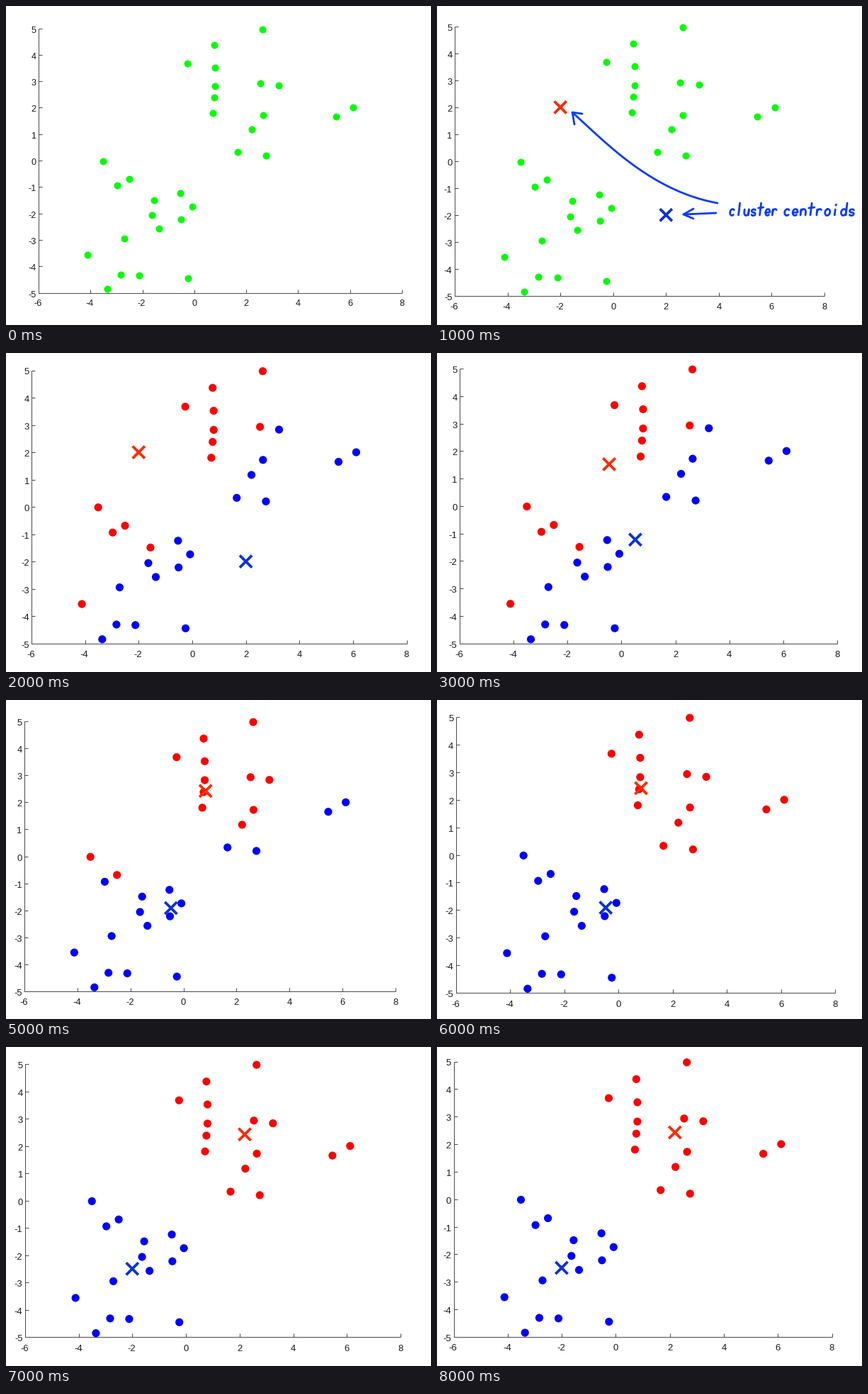
A matplotlib script that plays this animation: 600x450 px, repeating every 9 s.

```python
import numpy as np
import matplotlib.pyplot as plt
from matplotlib.animation import FuncAnimation

W, H, DPI = 600, 450, 100
PX = 72 / DPI  # points per pixel
ASPECT = 1.375  # plot width / height

GREEN, RED, BLUE = "#00ff00", "#ff0000", "#0000ff"
CROSS = ("#ff2a00", "#0a32d8")
INK = "#0a3cff"
AXIS = "#4a4a4a"

# The sample data: an upper and a lower cloud
UPPER = [(2.63, 4.97), (0.76, 4.36), (-0.26, 3.67), (0.8, 3.52), (0.8, 2.82),
         (0.76, 2.38), (0.71, 1.8), (2.53, 2.93), (3.24, 2.83), (2.64, 1.72),
         (2.21, 1.17), (1.66, 0.33), (2.75, 0.2), (5.46, 1.65), (6.12, 2)]
LOWER = [(-3.51, -0.02), (-2.97, -0.94), (-2.51, -0.69), (-1.56, -1.49),
         (-0.53, -1.24), (-0.08, -1.74), (-1.64, -2.06), (-1.36, -2.57),
         (-0.51, -2.22), (-2.71, -2.95), (-4.12, -3.56), (-2.83, -4.31),
         (-2.12, -4.33), (-3.36, -4.85), (-0.25, -4.45)]
POINTS = np.array(UPPER + LOWER)
START = np.array([(-2.0, 2.0), (2.0, -2.0)])

# Left, top and width of the plot in every step
BOXES = [(46, 31.5, 513), (25, 29, 522), (36, 24.5, 529.5),
         (32, 22, 533), (28, 30.5, 522.5), (26, 30, 524),
         (27, 24, 535), (27, 24, 530), (23.5, 20.5, 534)]


def k_means(rounds):
    """Alternate assign and move steps, as (labels, centers) pairs."""
    centers, steps = START, []
    for _ in range(rounds):
        gaps = POINTS[:, None] - centers
        labels = (gaps ** 2).sum(axis=2).argmin(axis=1)
        steps.append((labels, centers))
        centers = np.array([POINTS[labels == k].mean(axis=0) for k in (0, 1)])
        steps.append((labels, centers))
    return steps


STEPS = [(None, None), (None, START)] + k_means(4)[:7]


def arc(start, stop, cy=2, rx=4, ry=4.5):
    a = np.radians(np.linspace(start, stop, 24))
    return np.column_stack([4 + rx * np.cos(a), cy + ry * np.sin(a)])


def path(*parts):
    return np.vstack(parts)


# Pen strokes of each letter, y down, built from bowls and stems
STEM = path((0, -2), (0, 6))
TALL = path((3, -11), (3, 6))
LETTERS = {
    "c": [arc(-45, -310)],
    "e": [path((0.5, 2.5), arc(0, -310))],
    "o": [arc(-90, -450)],
    "d": [arc(-30, -330), TALL + (5, 0)],
    "l": [TALL],
    "t": [TALL, path((-1, -4), (8, -5))],
    "i": [STEM + (3, 0), path((3, -8), (3.5, -9))],
    "n": [STEM, path(arc(180, 360), (8, 6))],
    "r": [STEM, arc(180, 310)],
    "u": [path((0, -2), arc(180, 0), (8, -2)), STEM + (8, 0)],
    "s": [path(arc(-30, -270, 0, 3.5, 2.2), arc(-90, 150, 4.4, 3.5, 2.2))],
}

fig = plt.figure(figsize=(W / DPI, H / DPI), dpi=DPI, facecolor="white")
ax = fig.add_axes([0, 0, 1, 1])


def line(pts, color, width, **kw):
    x, y = np.transpose(pts)
    ax.plot(x, y, color=color, lw=width * PX, **kw)


def ink(pts):
    line(pts, INK, 2.8, solid_capstyle="round", solid_joinstyle="round",
         zorder=4)


def bezier(a, b, c, d):
    t = np.linspace(0, 1, 40)[:, None]
    a, b, c, d = np.array([a, b, c, d])
    return ((1 - t) ** 3 * a + 3 * t * (1 - t) ** 2 * b
            + 3 * t ** 2 * (1 - t) * c + t ** 3 * d)


def write(word, x, y, pitch):
    """Slanted handwriting with evenly spaced letters."""
    slant = np.array([(pitch / 13, 0), (-0.12, 1)])
    for i, ch in enumerate(word):
        for stroke in LETTERS[ch]:
            ink(stroke @ slant + (x + i * pitch, y))


def draw_notes():
    ink(bezier((192, 151), (238, 192), (302, 261), (396, 278)))
    ink([(194, 167), (191, 150), (205, 152)])
    ink([(394, 292), (348, 294)])
    ink([(362, 286), (348, 294), (362, 300)])
    write("cluster", 414, 289, 10)
    write("centroids", 491, 289, 11.4)


def to_px(box, pts):
    left, top, width = box
    x, y = np.asarray(pts, float).T
    return np.column_stack([left + (x + 6) / 14 * width,
                            top + (5 - y) / 10 * width / ASPECT])


def draw_axes(box):
    left, top, width = box
    height = width / ASPECT
    bottom = top + height
    size = width / 528 * 13 * PX
    style = dict(family="Liberation Sans", size=size, color="#1a1a1a",
                 va="baseline")
    rule = dict(color=AXIS, width=1, solid_capstyle="butt", zorder=1)
    line([(left, top), (left, bottom), (left + width, bottom)], **rule)
    for v in range(-6, 9, 2):
        x = left + (v + 6) / 14 * width
        line([(x, bottom), (x, bottom - 5)], **rule)
        ax.text(x - (v < 0), bottom + 0.05 * height, str(v), ha="center",
                **style)
    for v in range(-5, 6):
        y = top + (5 - v) / 10 * height
        line([(left, y), (left + 5, y)], **rule)
        ax.text(left - 3.5, y + 6, str(v), ha="right", **style)


def draw(i):
    ax.clear()
    ax.set(xlim=(0, W), ylim=(H, 0))
    ax.axis("off")
    box = BOXES[i]
    labels, centers = STEPS[i]
    draw_axes(box)

    colors = GREEN if labels is None else [(RED, BLUE)[k] for k in labels]
    radius = 5 if labels is None else 5.6
    ax.scatter(*to_px(box, POINTS).T, s=(2 * radius * PX) ** 2, c=colors,
               linewidths=0, zorder=2)

    if centers is not None:
        r = 8.6
        for (x, y), color in zip(to_px(box, centers), CROSS):
            for s in (-r, r):
                line([(x - r, y - s), (x + r, y + s)], color, 3.8,
                     solid_capstyle="butt", zorder=3)
        if labels is None:
            draw_notes()
    return ax.get_children()


anim = FuncAnimation(fig, draw, frames=len(BOXES), interval=1000,
                     init_func=lambda: draw(0), repeat=True, repeat_delay=0,
                     blit=False)
plt.show()
```
